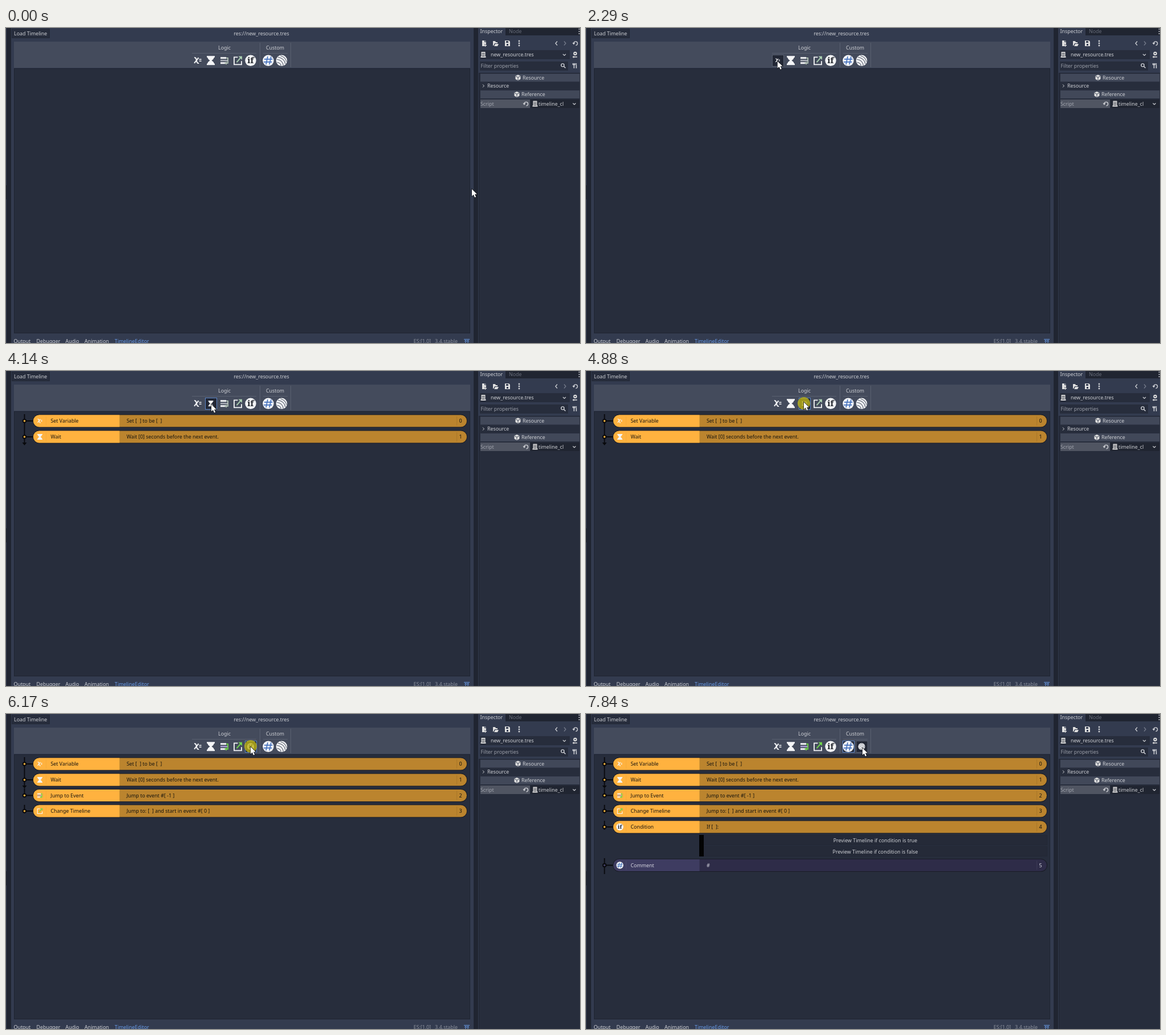
Write an HTML page with a canvas that moves like this. It is 1009 by 555 pixels and loops after 8000 ms.

```html
<!DOCTYPE html>
<html lang="en">
<head>
<meta charset="utf-8">
<title>Timeline editor</title>
<style>
  html, body { margin: 0; height: 100%; overflow: hidden; background: #333b4f; }
  canvas { display: block; }
</style>
</head>
<body>
<canvas id="stage" width="1009" height="555"></canvas>
<script>
const ctx = document.getElementById('stage').getContext('2d');
const LOOP = 8000, TICK = 67;
const BASE = '#333b4f', DARK = '#272d3c', DEEP = '#202531', BAR = '#444b5c';
const INK = '#cdcfd4', DIM = '#8b909c', ACCENT = '#699ce8', WHITE = '#f4f5f7';

// [first step, last step, x, y] of the pointer tip
const moves = [
  [70, 70, 816, 282], [600, 950, 431, 135], [1090, 1490, 308, 72],
  [1560, 1890, 340, 57], [1960, 2290, 336, 59], [2690, 2760, 343, 65],
  [3290, 3290, 394, 84], [3490, 3560, 361, 59], [4340, 4490, 383, 55],
  [5210, 5280, 405, 56], [5740, 5880, 430, 58], [6570, 6830, 467, 59],
  [7090, 7160, 467, 60], [7690, 7840, 486, 60]
];
const hovers = [1890, 3490, 4340, 5210, 5740, 6640, 7690];
const presses = [2620, 3770, 4880, 5610, 6100, 7360];
const added = [2690, 3900, 4950, 5680, 6230, 7490];
const buttonX = [337, 360, 384, 407.5, 430, 461, 484.5];

const rows = [
  [88, 'Set Variable', 'Set [  ] to be [  ]', 76, 104],
  [116, 'Wait', 'Wait [0] seconds before the next event.', 104, 128],
  [143.5, 'Jump to Event', 'Jump to event #[ -1 ]', 131, 147],
  [171, 'Change Timeline', 'Jump to: [  ] and start in event #[ 0 ]', 160, 175],
  [199, 'Condition', 'If [  ]:', 188, 204],
  [266.5, 'Comment', '#', 254, 282]
];

function rect(x, y, w, h, color) {
  ctx.fillStyle = color;
  ctx.fillRect(x, y, w, h);
}
function frame(x, y, w, h, color) {
  ctx.strokeStyle = color;
  ctx.lineWidth = 1;
  ctx.strokeRect(x + .5, y + .5, w - 1, h - 1);
}
function fill(d, color) {
  ctx.fillStyle = color;
  ctx.fill(new Path2D(d));
}
function line(d, color, width = 1) {
  ctx.strokeStyle = color;
  ctx.lineWidth = width;
  ctx.stroke(new Path2D(d));
}
function disc(x, y, r, color) {
  ctx.fillStyle = color;
  ctx.beginPath();
  ctx.arc(x, y, r, 0, 7);
  ctx.fill();
}
function text(s, x, y, color = INK, align = 'left', font = '8.87px "Noto Sans", sans-serif') {
  ctx.font = font;
  ctx.textAlign = align;
  ctx.fillStyle = color;
  ctx.fillText(s, x, y + 3.3);
}
function at(x, y, scale, draw) {
  ctx.save();
  ctx.translate(x, y);
  ctx.scale(scale, scale);
  draw();
  ctx.restore();
}

const icons = [
  () => {
    line('M-6 -5Q-3 -6 -2 0T2 4.5M1.5 -5L-6 4.5', WHITE, 2);
    line('M2.5 -2H6.5M2.5 1H6.5', WHITE, 1.5);
  },
  () => fill('M-7 -8H7V-5.5H6Q5 -2 1.5 0Q5 2 6 5.5H7V8H-7V5.5H-6Q-5 2 -1.5 0Q-5 -2 -6 -5.5H-7Z', WHITE),
  vivid => {
    line('M-7 -4.5H3M-7 4.5H3', WHITE, 3);
    line('M-7 0H6', vivid ? '#a69bd0' : '#a9adb7', 2.5);
    line('M3 -4.5H6V4.5H3', vivid ? '#6fd44b' : '#b4c3b7', 1.8);
    fill('M4 1.5V7.5L0 4.5Z', vivid ? '#6fd44b' : '#b4c3b7');
  },
  vivid => {
    line('M0 -6H-6.5V7H6.5V1', WHITE, 1.8);
    line('M-2 3L5 -5', vivid ? '#6fd44b' : '#a9cdb0', 2);
    fill('M1 -7.5H7.5V-1Z', vivid ? '#6fd44b' : '#a9cdb0');
  },
  () => {
    disc(0, 0, 9.7, WHITE);
    text('if', 0, 1.5, '#22252c', 'center', 'bold 15px "Noto Serif", serif');
  },
  () => {
    disc(0, 0, 9.7, WHITE);
    line('M-1 -7L-4 7M5 -7L2 7M-7 -2.5H7.5M-8 2.5H6.5', '#4672bd', 1.7);
  },
  () => {
    disc(0, 0, 9.7, WHITE);
    line('M-8.5 -2Q2 -1 3 9M-6.5 -6Q5 -4 6.5 6M-2 -8.5Q7 -6 8.5 2M-8 3Q-2 4 -1 9', '#6c727f', 1.3);
  }
];

function chevron(x, y) {
  line(`M${x - 2.5} ${y - 1}l2.5 2.5l2.5 -2.5`, INK, 1.2);
}
function scroll(x, y) {
  fill(`M${x - 3} ${y - 5}h7v8h1v2h-9v-2h1z`, '#e0e0e0');
  line(`M${x - 2} ${y - 2.5}h5m-5 2.5h5m-5 2.5h5`, DEEP);
}
function revert(x, y) {
  line(`M${x - 3} ${y}a3.3 3.3 0 1 1 3.5 3.5`, INK, 1.4);
  fill(`M${x - 5.5} ${y - 1}h5l-2.5 3.5z`, INK);
}
function sectionHead(label, x, y) {
  rect(834, y - 7, 174, 14, '#414859');
  fill(`M${x - 8} ${y - 5}l4.5 2v5.5l-4.5 2.5l-4.5 -2.5v-5.5z`, '#e0e0e0');
  line(`M${x - 12} ${y - 2.5}l4 2l4 -2m-4 2v5`, '#414859');
  text(label, x, y);
}

function drawShell() {
  rect(0, 0, 1009, 555, BASE);
  rect(1, 0, 8, 555, DEEP);
  rect(0, 277, 1, 25, DEEP);
  rect(822, 0, 8, 555, DEEP);
  rect(10, 1, 67, 17, DARK);
  frame(10, 1, 67, 17, '#222836');
  text('Load Timeline', 14, 9.5);
  text('res://new_resource.tres', 449, 9.5, INK, 'center');

  rect(14, 24, 802, 46, BAR);
  rect(14, 71, 802, 467, DARK);
  frame(14, 71, 802, 467, '#1f2431');
  text('Logic', 384, 34.5, INK, 'center');
  text('Custom', 473, 34.5, INK, 'center');
  line('M327 44.5H440M452 44.5H495M446.5 26V69M500.5 26V69', '#596070');

  const tabs = { Output: 13.5, Debugger: 53.5, Audio: 104.5, Animation: 138 };
  for (const name in tabs) text(name, tabs[name], 551.5);
  text('TimelineEditor', 191, 551.5, ACCENT);
  text('ES:[1.0]', 716.5, 551.5, DIM);
  text('3.4.stable', 754, 551.5, DIM);
  line('M805 548.5H815M808 555V550M812 555V550M806 552L808 550L810 552L812 550L814 552', ACCENT);
}

function drawInspector() {
  rect(878, 0, 131, 13, DEEP);
  text('Inspector', 833.5, 6);
  text('Node', 884, 6, '#666c79');
  for (const y of [2, 6, 10]) disc(1007.5, y, 1, INK);
  for (const y of [23, 27, 31]) disc(902, y, 1.4, INK);

  fill('M837 22h4v3h3v3h-3v4h-4zM842 22l2 2h-2z', '#e0e0e0');
  line('M842.5 28v5M840 30.5h5', '#e0e0e0', 1.4);
  fill('M856 23h4l1 2h3v2h-5l-2 4h-1zM860 28h6l-2 4h-6z', '#e0e0e0');
  fill('M877 22h7l2 2v8h-9z', '#e0e0e0');
  rect(879, 23, 4, 3, BASE);
  rect(880, 28, 3, 3, BASE);
  line('M969 23.5L966 27L969 30.5', INK, 1.3);
  line('M981 23.5L984 27L981 30.5', '#747b8a', 1.3);
  revert(1001, 27);

  rect(833, 39, 158, 16, DARK);
  scroll(838.5, 47);
  text('new_resource.tres', 852, 47);
  chevron(981.5, 47);
  disc(1000.5, 45, 3.2, '#e0e0e0');
  disc(1000.5, 45, 1.2, BASE);
  line('M996 51H1004M998 49.5V52.5', '#e0e0e0', 1.5);

  rect(833, 59, 155, 16, DARK);
  text('Filter properties', 834.5, 66.5, '#9b9fa9');
  ctx.beginPath();
  ctx.arc(978.5, 65.5, 2.6, 0, 7);
  ctx.strokeStyle = INK;
  ctx.lineWidth = 1.4;
  ctx.stroke();
  line('M980.5 67.5L983.5 70.5', INK, 1.6);
  line('M998.5 62V71M1002.5 66V71', INK, 1.6);
  line('M996.5 62V64.5H1000.5V62M1002.5 62V66', INK, 1.3);

  rect(831, 79, 178, 476, DARK);
  frame(831, 79, 179, 477, '#1f2431');
  sectionHead('Resource', 908, 87.5);
  line('M838 99.5L840.5 102L838 104.5', INK);
  text('Resource', 846, 102);
  sectionHead('Reference', 906, 117);
  rect(834, 126, 87, 15, '#505562');
  text('Script', 834, 133.5, '#a0a4ad');
  revert(914, 133.5);
  rect(922, 126, 86, 15, DEEP);
  scroll(929.5, 133.5);
  text('timeline_cl', 936, 133.5);
  chevron(999, 133.5);
}

function drawRow([y, name, detail, top, bottom], i) {
  const comment = i === 5;
  const ink = comment ? '#d5d5df' : '#16140f';
  line(`M32.5 ${top}V${bottom}M33 ${y}H48`, '#08090c', 1.8);
  if (i === 1) fill('M28.5 126H36.5L32.5 131Z', '#08090c');
  disc(32.5, y, 3.7, '#08090c');
  disc(32.5, y, 1.8, comment ? '#3e3c61' : '#ffb23f');

  ctx.save();
  ctx.beginPath();
  ctx.roundRect(48, y - 10.5, 762, 21, 10.5);
  ctx.strokeStyle = '#191c26';
  ctx.lineWidth = 2;
  ctx.stroke();
  ctx.clip();
  rect(48, y - 11, 762, 22, comment ? '#2e2c48' : '#bb842e');
  rect(48, y - 11, 151.5, 22, comment ? '#3e3c61' : '#ffb23f');
  rect(70, y - 8, 1, 16, comment ? '#49476d' : '#f5aa3a');
  rect(792, y - 8, 1, 16, comment ? '#3b3955' : '#a97728');
  ctx.restore();

  at(59.5, y, .64, () => icons[i](true));
  text(name, 78.5, y, ink);
  text(detail, 212, y, ink);
  text(i, 799, y, ink, 'center');

  if (i === 4) {
    ['true', 'false'].forEach((value, k) => {
      rect(206, 213 + k * 20, 605, 18, '#252a38');
      frame(206, 213 + k * 20, 605, 18, '#232835');
      text('Preview Timeline if condition is ' + value, 508.5, 222.5 + k * 20, INK, 'center');
    });
    rect(199, 213, 8, 38, '#030304');
  }
}

function pointerAt(t) {
  let x = 819, y = 284;
  for (const [start, end, toX, toY] of moves) {
    if (t < start) break;
    const steps = Math.round((end - start) / TICK) + 1;
    const p = Math.min(1, (Math.floor((t - start) / TICK) + 1) / steps);
    x += (toX - x) * p;
    y += (toY - y) * p;
  }
  return [x, y];
}

function draw(t) {
  const countUntil = times => times.filter(time => t >= time).length;
  const hovered = countUntil(hovers) - 1;
  const focused = countUntil(presses) - 1;
  const rowCount = countUntil(added);
  const [x, y] = pointerAt(t);

  drawShell();
  drawInspector();
  buttonX.forEach((bx, i) => {
    if (i === hovered || i === focused) {
      rect(bx - 10, 47, 21, 21, '#222735');
      frame(bx - 10, 47, 21, 21, i === focused ? '#5d87c8' : '#596070');
    }
    at(bx, 57.3, i === hovered ? .62 : 1, () => icons[i](hovered > i));
  });
  rows.slice(0, rowCount).forEach(drawRow);

  if (focused >= rowCount) disc(x, 57, 11, 'rgba(190,180,24,.8)');
  at(x, y, 1, () => {
    const arrow = 'M0 0V12.2L2.9 9.5L5 14.4L7.1 13.4L5 8.7H8.8Z';
    line(arrow, '#15171c', 1.4);
    fill(arrow, '#fff');
  });
}

function tick() {
  draw(performance.now() % LOOP);
  requestAnimationFrame(tick);
}
tick();
</script>
</body>
</html>
```
